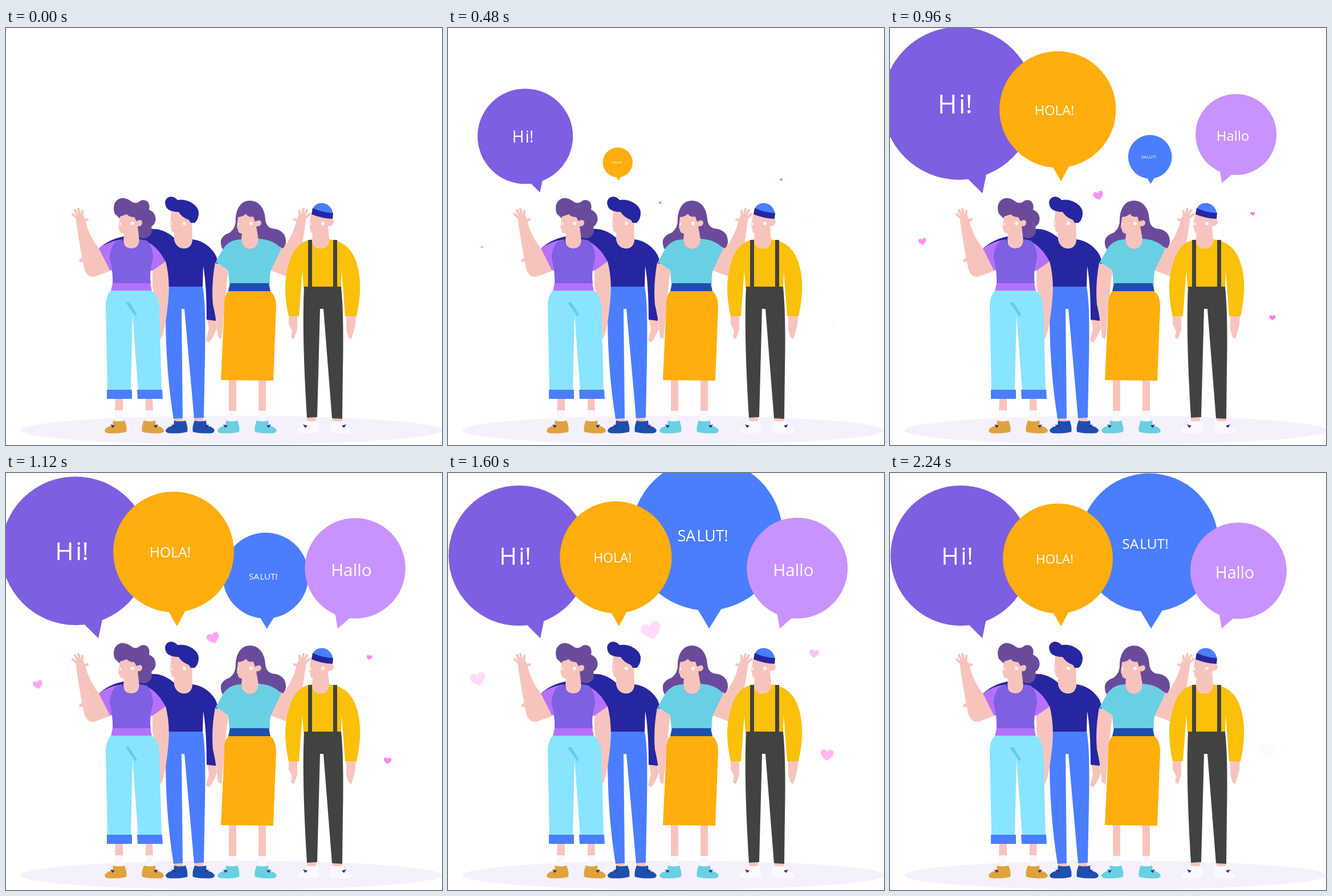
Recreate the animation shown at these times as an HTML page. Size 765 by 732 pixels, loop 2480 ms.

```html
<!DOCTYPE html>
<html lang="en">
<head>
<meta charset="utf-8">
<title>Greetings</title>
<style>
html, body { margin: 0; width: 100%; height: 100%; overflow: hidden; background: #fff; }
svg { display: block; width: 100%; height: 100%; }
text { font-family: "Open Sans", "Noto Sans", sans-serif; font-weight: 500; fill: #fff; text-anchor: middle; }
.skin { fill: #f7c4bd; }
.hair { fill: #6a4b9b; }
.navy { fill: #2626a0; }
.blue { fill: #4a7eff; }
.deep { fill: #1e4fae; }
.violet { fill: #7f5fe2; }
.lilac { fill: #b671fc; }
.sky { fill: #88e4ff; }
.teal { fill: #69d0e3; }
.amber { fill: #ffae0d; }
.gold { fill: #fac00a; }
.coal { fill: #424240; }
.tan { fill: #e0a23c; }
.sock { fill: #f8f7fb; }
.snow { fill: #faf9fe; }
.glow { fill: #fff; fill-opacity: .85; }
</style>
</head>
<body>
<svg viewBox="0 0 765 732">
  <defs>
    <g id="shoe">
      <path d="M15 689Q25 692 35 689Q40 701 38 709Q28 712 8 711.500Q0 711 0 706Q4 699 14 698Z"/>
      <path d="M10 696L18 698L14 702Z" fill="#3b2a86"/>
    </g>
    <g id="wave" class="skin">
      <path d="M123 340Q129 330 139 338Q146 366 163 387L169 384L189 424L157 436Q144 440 138 425Q132 400 123 340Z"/>
      <path d="M128 337L117 327M129 335L121 320M131 335L127 318M133 336L134 321M134 340L143 336"
            fill="none" stroke="#f7c4bd" stroke-width="4.2" stroke-linecap="round"/>
      <ellipse cx="131" cy="337" rx="8" ry="8"/>
    </g>
    <path id="heart" d="M0 .44C-.2 .27 -.5 .12 -.5 -.15C-.5 -.47 -.1 -.5 0 -.22C.1 -.5 .5 -.47 .5 -.15C.5 .12 .2 .27 0 .44Z"/>
  </defs>

  <ellipse cx="395.500" cy="706" rx="370" ry="25.500" fill="#f4f1fd"/>

  <!-- man in navy -->
  <g>
    <path class="skin" d="M137 401L128 407L129 411L138 410Z"/>
    <path class="navy" d="M162 388Q180 371 206 366L240 356Q270 345 297 370L300 455L270 420Z"/>
    <path class="skin" d="M353 511L368 513L370 527Q363 545 356 552L351 548L356 528Z"/>
    <path class="navy" d="M284 392L297 371Q300 387 313 387Q326 386 327 371Q352 374 367 397Q375 412 372 440L368 514L352 512Q352 450 346 418L345 456L284 456Z"/>
    <path class="skin" d="M290 318L326 322L327 371Q326 386 313 387Q299 387 295 372L295 359Q289 358 290 351L288 347Z"/>
    <path class="navy" d="M279 306Q281 296 290 296Q297 297 301 302Q314 300 326 307Q339 315 338 327Q337 337 331 342H324L321 337Q308 332 303 323Q288 323 282 316Q279 311 279 306Z"/>
    <circle class="glow" cx="313" cy="343" r="3"/><path class="glow" d="M290 341Q294 344 290 347Z"/>
    <path class="skin" d="M294 683H310V691H296ZM331 683H346V691H331Z"/>
    <path class="blue" d="M283 454H345Q351 480 349 580L347 684L330 685L313 493H308L310 685L294 686Q280 600 280 500Z"/>
    <use href="#shoe" x="280" class="deep"/>
    <use href="#shoe" transform="translate(366) scale(-1 1)" class="deep"/>
  </g>

  <!-- woman with curly hair -->
  <g>
    <path class="skin" d="M257 420L280 409Q288 440 285 475Q280 530 272 546L268 540L266 490L257 455Z"/>
    <use href="#wave"/>
    <path class="hair" d="M191 326C184 308 197 296 208 299Q215 300 222 306Q230 309 236 303C246 299 254 307 251 319C264 324 267 340 255 349C259 362 250 370 240 369Q231 369 231 358L198 333Z"/>
    <path class="skin" d="M200 331L212 327Q216 332 225 332L229 339Q238 334 239 341Q239 349 231 348L234 373Q233 387 219 387Q206 386 206 373L207 361Q199 360 199 354L197 350Z"/>
    <circle class="glow" cx="222" cy="343" r="3"/><path class="glow" d="M200 341Q205 344 199 347Z"/>
    <path class="lilac" d="M204 371Q178 375 163 387L182 425L257 426L280 410Q262 376 235 371Q234 387 220 387Q206 387 204 371Z"/>
    <path class="violet" d="M204 371L191 376Q181 390 182 405Q188 428 187 449H254Q251 430 258 405Q258 384 247 373L235 371Q234 387 220 387Q206 387 204 371Z"/>
    <path class="lilac" d="M187 448H253L256 462H184Z"/>
    <path class="skin" d="M192 650H205V672H191ZM245 650H257L258 672H245Z"/>
    <path class="sock" d="M191 671H204V691H190ZM245 671H258V691H245Z"/>
    <path class="sky" d="M184 461H256Q268 470 269 488L273 637H232L222 503L219 637H178L175 488Q175 470 184 461Z"/>
    <path d="M210 482L216 481L230 503L227 506Z" fill="#62cfe3"/>
    <path class="blue" d="M177 635H221V651H177ZM230 635H274L275 651H231Z"/>
    <use href="#shoe" x="173" class="tan"/>
    <use href="#shoe" transform="translate(277) scale(-1 1)" class="tan"/>
  </g>

  <!-- woman with long hair -->
  <g>
    <path class="hair" d="M428 303C444 303 454 317 455 335Q456 349 467 352Q492 354 491 377Q488 391 478 393L385 392Q376 388 377 373Q379 364 393 359Q404 350 403 335C404 317 412 303 428 303Z"/>
    <use href="#wave" transform="translate(649) scale(-1 1)"/>
    <path class="skin" d="M367 412L391 424Q386 450 384 485L378 546L372 543Q369 510 363 485Q360 450 367 412Z"/>
    <path class="teal" d="M413 371Q393 371 382 386L368 411L390 425L392 450H463Q462 432 465 425L483 387Q468 371 443 370Q442 387 428 388Q414 387 413 371Z"/>
    <path class="skin" d="M407 332Q417 331 421 326Q424 333 434 331L437 340Q447 334 448 342Q447 349 439 348L443 371Q442 387 428 388Q414 387 413 371L414 361Q407 360 407 354L405 350Z"/>
    <circle class="glow" cx="430" cy="343" r="3"/><path class="glow" d="M407 341Q412 344 406 347Z"/>
    <path class="deep" d="M393 448H461L464 462H390Z"/>
    <path class="skin" d="M391 617H404V673H391ZM443 617H456V673H443Z"/>
    <path class="sock" d="M391 672H403V691H390ZM443 672H456V691H443Z"/>
    <path class="amber" d="M390 462H464Q474 470 474 490L469 619L377 618L383 490Q382 470 390 462Z"/>
    <use href="#shoe" x="371" class="teal"/>
    <use href="#shoe" transform="translate(475) scale(-1 1)" class="teal"/>
  </g>

  <!-- man with braces -->
  <g>
    <path class="skin" d="M496 504H511V530L505 546L500 543L502 532L496 520ZM597 504H614L613 522L606 546L601 543L597 530Z"/>
    <path class="gold" d="M537 371Q506 375 496 415Q484 455 496 506H514L520 425L522 456H588L589 425L595 506H615Q628 448 614 409Q602 375 567 371Q566 387 552 387Q538 387 537 371Z"/>
    <path class="skin" d="M535 326L564 333Q575 333 575 341Q574 348 565 348L567 371Q566 387 552 387Q538 387 537 371L538 360Q533 359 534 352L532 348Z"/>
    <circle class="glow" cx="556" cy="343" r="3"/><path class="glow" d="M534 341Q539 344 533 347Z"/>
    <path class="blue" d="M538 319C541 303 570 301 574 327Z"/>
    <path class="navy" d="M538 316Q555 324 574 325L573 335Q553 334 536 327Z"/>
    <path class="coal" d="M530 372H537V456H530ZM574 372H581V456H574Z"/>
    <path class="skin" d="M528 682H544V691H528ZM573 683H590V691H573Z"/>
    <path class="coal" d="M523 454H588Q593 500 591 600L590 686L572 685L557 493H551L546 683L528 684Q519 540 523 454Z"/>
    <use href="#shoe" x="511" class="snow"/>
    <use href="#shoe" transform="translate(607) scale(-1 1)" class="snow"/>
  </g>

  <g id="hearts" fill="#ff70ea"></g>

  <g class="bubble">
    <path fill="#7e5ee1" d="M136 264L169 256L162 290Z"/>
    <circle fill="#7e5ee1" cx="124" cy="145" r="123"/>
    <text x="118" y="161" font-size="42">H<tspan dx="3">i!</tspan></text>
  </g>
  <g class="bubble">
    <path fill="#4a7eff" d="M439 241H478L458 273Z"/>
    <circle fill="#4a7eff" cx="454.500" cy="122.500" r="121.500"/>
    <text x="448" y="133" font-size="24.500">SA<tspan dx="2">LUT!</tspan></text>
  </g>
  <g class="bubble">
    <path fill="#ffae0d" d="M285 243H314L300 269Z"/>
    <circle fill="#ffae0d" cx="294.500" cy="150" r="96.500"/>
    <text x="289" y="159" font-size="22.500">HOLA!</text>
  </g>
  <g class="bubble">
    <path fill="#c993ff" d="M577 243L605 253L582 273Z"/>
    <circle fill="#c993ff" cx="611.500" cy="171.500" r="84.500"/>
    <text x="605" y="185" font-size="28.500">Hallo</text>
  </g>
</svg>

<script>
const LOOP = 2480, STEP = 80, LAST = 2240;

// bubble scale sampled every STEP ms
const pop = [0, .03, .12, .23, .367, .52, .68, .845, .96, 1.046, 1.09, 1.1,
  1.09, 1.077, 1.06, 1.047, 1.033, 1.02, 1.01, 1.004, 1];

// delay and pivot, in document order
const bubbles = [
  { delay: 0, x: 160, y: 286 },
  { delay: 670, x: 457, y: 274 },
  { delay: 216, x: 299, y: 268 },
  { delay: 402, x: 584, y: 269 }
];

// each heart drifts from (from) to (to), reaching width w at 1600 ms
const hearts = [
  { start: 300, from: [61, 388], to: [53, 362], w: 27, fade: [640, 1920], turn: -14 },
  { start: 290, from: [375, 312], to: [357, 277], w: 35, fade: [640, 1920], turn: -18 },
  { start: 400, from: [631, 334], to: [642, 317], w: 17, fade: [860, 2150], turn: 10 },
  { start: 420, from: [676, 520], to: [665, 495], w: 23, fade: [860, 2300], turn: 3 }
];

const clamp = (v, lo, hi) => Math.min(hi, Math.max(lo, v));
const mix = (a, b, p) => a + (b - a) * p;

function popScale(age) {
  const pos = clamp(age / STEP, 0, pop.length - 1);
  const i = Math.min(Math.floor(pos), pop.length - 2);
  return mix(pop[i], pop[i + 1], pos - i);
}

const bubbleNodes = document.querySelectorAll(".bubble");
const heartNodes = hearts.map(() => {
  const node = document.createElementNS("http://www.w3.org/2000/svg", "use");
  node.setAttribute("href", "#heart");
  return document.getElementById("hearts").appendChild(node);
});

function draw(t) {
  bubbles.forEach((b, i) => {
    const s = popScale(t - b.delay);
    const node = bubbleNodes[i];
    node.setAttribute("visibility", s > 0 ? "visible" : "hidden");
    node.setAttribute("transform",
      `translate(${b.x} ${b.y}) scale(${s}) translate(${-b.x} ${-b.y})`);
  });
  hearts.forEach((h, i) => {
    const p = clamp((t - h.start) / (1600 - h.start), 0, 1.3);
    const alpha = clamp((h.fade[1] - t) / (h.fade[1] - h.fade[0]), 0, 1);
    const x = mix(h.from[0], h.to[0], p), y = mix(h.from[1], h.to[1], p);
    const node = heartNodes[i];
    node.setAttribute("opacity", p > 0 ? alpha : 0);
    node.setAttribute("transform", `translate(${x} ${y}) rotate(${h.turn}) scale(${h.w * p})`);
  });
}

const begin = performance.now();
function tick() {
  const t = (performance.now() - begin) % LOOP;
  draw(Math.min(Math.floor(t / STEP) * STEP, LAST));
  requestAnimationFrame(tick);
}
tick();
</script>
</body>
</html>
```
